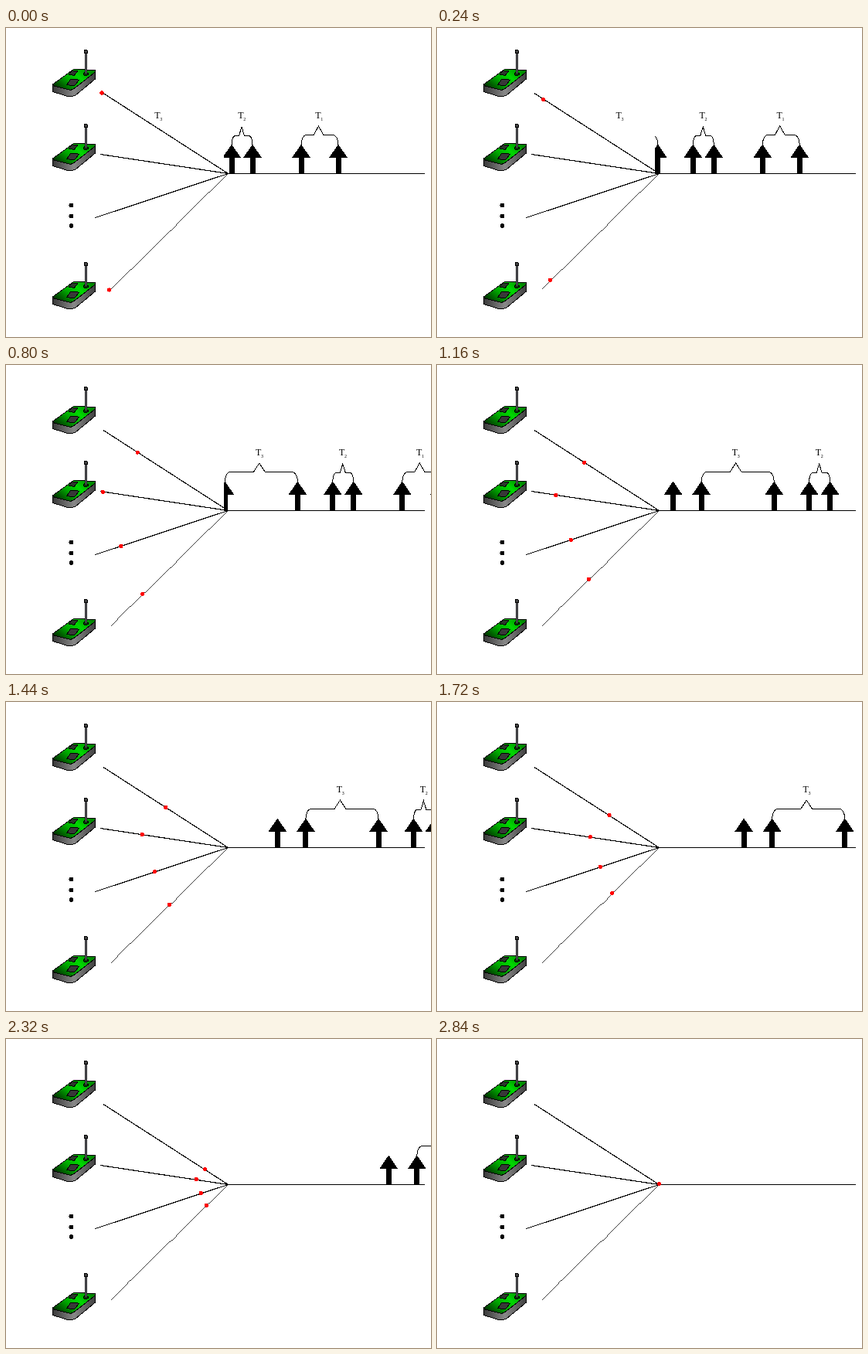
Animation, 550 px wide and 400 px high, one loop 2.88 s. Source, as an HTML page:

```html
<!DOCTYPE html>
<html lang="en">
<head>
<meta charset="utf-8">
<title>Packet arrivals</title>
<style>
  html, body { margin: 0; width: 100%; height: 100%; overflow: hidden; background: #fff; }
  svg { display: block; width: 550px; height: 400px; shape-rendering: crispEdges; }
  text { font-family: "Liberation Serif", "Times New Roman", serif; font-size: 12px; }
  .sub { font-size: 6px; }
  .line { fill: none; stroke: #000; stroke-width: 1; }
  .link { stroke-width: 1.2; }
  .thin { stroke-width: .75; }
</style>
</head>
<body>
<svg viewBox="0 0 550 400">
  <defs>
    <linearGradient id="top" x1="0" y1=".8" x2="1" y2=".2">
      <stop offset="0" stop-color="#002800"/>
      <stop offset=".4" stop-color="#00a800"/>
      <stop offset=".65" stop-color="#00d800"/>
      <stop offset="1" stop-color="#008000"/>
    </linearGradient>
    <linearGradient id="side">
      <stop offset="0" stop-color="#383838"/>
      <stop offset=".5" stop-color="#888"/>
      <stop offset="1" stop-color="#404040"/>
    </linearGradient>
    <clipPath id="channel"><rect x="282" y="90" width="268" height="110"/></clipPath>
    <g id="device" stroke="#000" stroke-width="1" stroke-linejoin="round">
      <path fill="url(#side)" d="M60.5 74.5L84 80.5L90 77L115.5 57V66L90 87L86 88.5H80L60.5 82.5Z"/>
      <path fill="url(#top)" d="M60.5 74.5V73L87.5 53.5L115.5 54.5V57L90 77Q86 81 82 80Z"/>
      <path fill="#2c382c" d="M81 60L86 54.8L93 55.8L88 61.5Z"/>
      <path fill="#383838" d="M78.5 73.5L84 66L94.5 67.2L88.5 75Z"/>
      <ellipse cx="103.3" cy="59.5" rx="3.2" ry="1.8" fill="#083808"/>
      <path d="M103.5 31V59" stroke="#222" stroke-width="3"/>
      <path d="M103.5 33V59" stroke="#66666e"/>
      <circle cx="103.3" cy="30.7" r="2.3" fill="#444"/>
    </g>
    <path id="arrow" d="M0 150.5L12 168H3.5V188.5H-3.5V168H-12Z"/>
  </defs>
  <use href="#device"/>
  <use href="#device" y="96"/>
  <use href="#device" y="275"/>
  <g>
    <circle cx="84.5" cy="229.5" r="3"/>
    <circle cx="84.5" cy="243.5" r="3"/>
    <circle cx="84.5" cy="256" r="3"/>
  </g>
  <path class="line link" d="M126 84.5L287.5 188.5M122 163.5L287.5 188.5M115.5 245.5L287.5 188.5"/>
  <path class="line thin" d="M135.5 337.5L287.5 188.5"/>
  <path class="line" d="M287 188.5H541.5"/>
  <g clip-path="url(#channel)"><g id="train"></g></g>
  <g id="labels"></g>
  <g id="packets" fill="#f00"></g>
</svg>
<script>
const STEP = 40, STEPS = 72, LAST = STEPS - 1;
const SPEED = 6.54;
const HUB = { x: 287.5, y: 187.5 };

const arrows = [430, 382, 319, 292, 246.6, 152.5, 115.9];

// Interval braces: ends, peak, peak half-width, bar height, label position
const braces = [
  { from: 382, to: 430, peak: 404.5, half: 6.5, bar: 138.5, label: 400.2 },
  { from: 292, to: 319, peak: 305, half: 3.5, bar: 139.5, label: 300.2 },
  { from: 152.5, to: 246.6, peak: 197, half: 7.5, bar: 138.5, label: 192.2 }
];

// Each packet leaves its sender at its own step; all reach the hub together
const packets = [
  { x: 124, y: 84, start: 0 },
  { x: 118.9, y: 163.4, start: 18 },
  { x: 113.5, y: 246.5, start: 7 },
  { x: 133.4, y: 339, start: 0 }
];

const byId = id => document.getElementById(id);

function add(parent, tag, attrs, text = "") {
  const node = document.createElementNS("http://www.w3.org/2000/svg", tag);
  for (const key in attrs) node.setAttribute(key, attrs[key]);
  node.textContent = text;
  return parent.appendChild(node);
}

function bracePath({ from, to, peak, half, bar }) {
  const bend = Math.min(7, (to - from) / 6);
  const corner = `A${bend} ${151 - bar} 0 0 1`;
  return `M${from} 151${corner} ${from + bend} ${bar}H${peak - half}` +
    `L${peak} ${bar - 11.5}L${peak + half} ${bar}H${to - bend}${corner} ${to} 151`;
}

const train = byId("train"), labels = byId("labels");
arrows.forEach(x => add(train, "use", { href: "#arrow", x }));
braces.forEach((brace, i) => {
  add(train, "path", { class: "line", d: bracePath(brace) });
  add(labels, "text", { x: brace.label, y: 117 }, "T");
  add(labels, "text", { class: "sub", x: brace.label + 7, y: 120 }, i + 1);
});
packets.forEach(p => p.node = add(byId("packets"), "circle", { r: 2.6 }));

function draw(now) {
  const step = Math.floor(now / STEP) % STEPS;
  const shift = `translate(${step * SPEED} 0)`;
  train.setAttribute("transform", shift);
  labels.setAttribute("transform", shift);
  for (const { x, y, start, node } of packets) {
    const k = (step - start) / (LAST - start);
    node.setAttribute("cx", x + (HUB.x - x) * k);
    node.setAttribute("cy", y + (HUB.y - y) * k);
    node.setAttribute("visibility", k < 0 ? "hidden" : "visible");
  }
}

let origin;
function tick(now) {
  origin ??= now;
  draw(Math.max(0, now - origin));
  requestAnimationFrame(tick);
}
draw(0);
requestAnimationFrame(tick);
</script>
</body>
</html>
```
